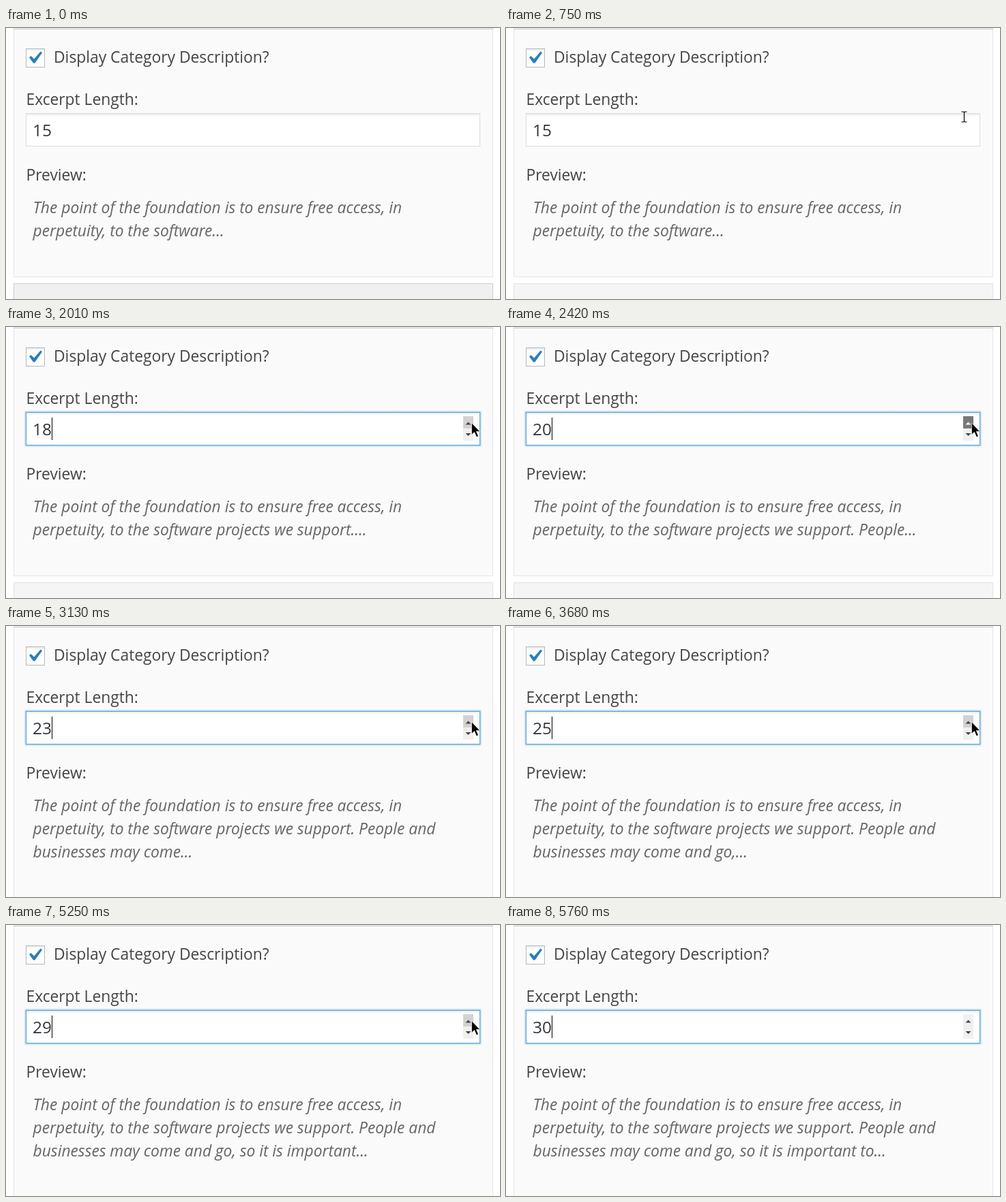
An HTML page for the animation above (6.15 s loop, 724 by 398 pixels).

```html
<!DOCTYPE html>
<html lang="en">
<head>
<meta charset="utf-8">
<title>Excerpt length</title>
<style>
html, body { margin: 0; width: 100%; height: 100%; overflow: hidden; background: #fff; }
svg { display: block; width: 724px; height: 398px; }
text { font: 22.8px "Open Sans", sans-serif; fill: #444; white-space: pre; }
#num { font-size: 24.5px; fill: #32373c; }
#preview text { font-size: 22.83px; font-style: italic; fill: #666; }
</style>
</head>
<body>
<svg viewBox="0 0 724 398">
  <defs>
    <filter id="soft" x="-5%" y="-30%" width="110%" height="160%"><feGaussianBlur stdDeviation="1"/></filter>
    <linearGradient id="inset" x2="0" y2="1"><stop stop-color="#000" stop-opacity=".08"/><stop offset="1" stop-color="#000" stop-opacity="0"/></linearGradient>
  </defs>

  <rect x="11.5" y="-9.5" width="702" height="420" fill="#fafafa" stroke="#e5e5e5"/>
  <rect x="11" width="703" height="1" fill="#f5f5f5"/>
  <rect x="11" y="1" width="703" height="1" fill="#c8c8c8"/>
  <g id="footer">
    <rect x="10" y="366" width="706" height="10" fill="#fff"/>
    <rect x="11" y="365" width="703" height="1" fill="#e5e5e5"/>
    <rect id="header" x="11.5" y="375.5" width="702" height="40"/>
  </g>

  <rect x="29.5" y="30.5" width="27" height="27" fill="#fff" stroke="#b4b9be"/>
  <rect x="30" y="31" width="26" height="4" fill="url(#inset)"/>
  <path transform="translate(23.4 25.5) scale(1.8375)" fill="#2b7fb9" d="M14.83 4.89l1.34.94-5.81 8.38H9.02L5.78 9.67l1.34-1.25 2.57 2.4z"/>
  <text x="70" y="51">Display Category Description?</text>
  <text x="29.5" y="113">Excerpt Length:</text>
  <text x="29.5" y="224">Preview:</text>

  <rect x="29.5" y="125.5" width="665" height="48" fill="#fff" stroke="#ddd"/>
  <g id="focus" fill="none">
    <rect x="29" y="125" width="666" height="49" stroke="#1e8cbe" stroke-width="2" opacity=".5" filter="url(#soft)"/>
    <rect x="30" y="126" width="664" height="47" fill="#fff"/>
    <rect x="29.5" y="125.5" width="665" height="48" stroke="#5b9dd9"/>
  </g>
  <rect x="30" y="126" width="664" height="4" fill="url(#inset)"/>
  <text id="num" x="39" y="159"></text>
  <rect id="caret" x="67" y="133" width="1" height="33" fill="#000"/>
  <g id="spin">
    <rect id="up" x="670" y="131" width="15" height="18"/>
    <rect x="670" y="149" width="15" height="18" fill="#f0f0f0"/>
    <path id="upArrow" d="M673.5 143.5h8l-4-4z"/>
    <path d="M673.5 156h8l-4 4z" fill="#444"/>
  </g>

  <g id="preview">
    <text x="39.5" y="272"></text>
    <text x="39.5" y="306"></text>
    <text x="39.5" y="340"></text>
  </g>

  <path id="arrow" d="M0 0V17L4 13.4 7 20.6 9.8 19.4 6.8 12.4H12Z" fill="#000" stroke="#fff" stroke-width=".6"/>
  <path id="beam" d="M-4 -7.5H-1L0 -6.5 1 -7.5H4M0 -6.5V6.5M-4 7.5H-1L0 6.5 1 7.5H4" fill="none" stroke="#000" stroke-width="1.2"/>
</svg>
<script>
const LOOP = 6150;
const ENTER = 290, HOVER = 830, CLICK = 1480, LEAVE = 5530, GONE = 5760;
const FIRST = 15, LAST = 30;
const PACE = 225, SLOW = 560, QUICK = 12;  // ms between clicks, and how many come quickly
const LAG = 65;                            // ms the button stays down and the preview waits

const el = id => document.getElementById(id);
const set = (id, attrs) => { for (const k in attrs) el(id).setAttribute(k, attrs[k]); };
const show = (id, on) => set(id, { visibility: on ? 'visible' : 'hidden' });
const clamp = (v, lo, hi) => Math.min(hi, Math.max(lo, v));
const smooth = p => p * p * (3 - 2 * p);

const lines = [
  'The point of the foundation is to ensure free access, in',
  'perpetuity, to the software projects we support. People and',
  'businesses may come and go, so it is important to'
].map(line => line.split(' '));
const rows = document.querySelectorAll('#preview text');

// pointer stops: time, x, y
const stops = [
  [ENTER, 626, 398], [750, 671.5, 130.5], [1240, 682.5, 141], [LEAVE, 682.5, 141], [GONE, 680, 398]
];

function pointer(t) {
  const i = clamp(stops.findIndex(s => s[0] > t), 1, stops.length - 1);
  const [t0, x0, y0] = stops[i - 1], [t1, x1, y1] = stops[i];
  const p = smooth(clamp((t - t0) / (t1 - t0), 0, 1));
  return [x0 + (x1 - x0) * p, y0 + (y1 - y0) * p];
}

function valueAt(t) {
  const since = t - CLICK, slow = since - QUICK * PACE;
  if (since < 0) return FIRST;
  const clicks = slow < 0 ? Math.floor(since / PACE) : QUICK + Math.floor(slow / SLOW);
  return Math.min(LAST, FIRST + 1 + clicks);
}

function drawPreview(count) {
  let left = count;
  lines.forEach((line, i) => {
    const ends = left > 0 && left <= line.length;
    rows[i].textContent = line.slice(0, Math.max(0, left)).join(' ') + (ends ? '...' : '');
    left -= line.length;
  });
}

function drawPointer(t) {
  const [x, y] = pointer(t);
  const inField = y > 125 && y < 174 && x < 675;
  const visible = t >= ENTER && t < GONE;
  show('beam', visible && inField);
  show('arrow', visible && !inField);
  for (const id of ['beam', 'arrow']) set(id, { transform: `translate(${x} ${y})` });
}

function draw(t) {
  const value = valueAt(t), shown = valueAt(t - LAG);
  const pressed = value !== shown;
  el('num').textContent = value;
  drawPreview(shown);
  drawPointer(t);

  set('focus', { opacity: clamp((t - CLICK + 45) / 100, 0, 1) });
  show('caret', t >= CLICK);
  show('spin', t >= HOVER);
  set('up', { fill: pressed ? '#787878' : t < LEAVE ? '#d2d2d2' : '#f0f0f0' });
  set('upArrow', { fill: pressed ? '#fff' : '#444' });

  show('footer', shown <= lines[0].length + lines[1].length);
  set('header', t < ENTER ? { fill: '#f0f0f0', stroke: '#ccc' } : { fill: '#f5f5f5', stroke: '#e2e2e2' });
}

const start = performance.now();
function tick() {
  draw((performance.now() - start) % LOOP);
  requestAnimationFrame(tick);
}
draw(0);
requestAnimationFrame(tick);
</script>
</body>
</html>
```
